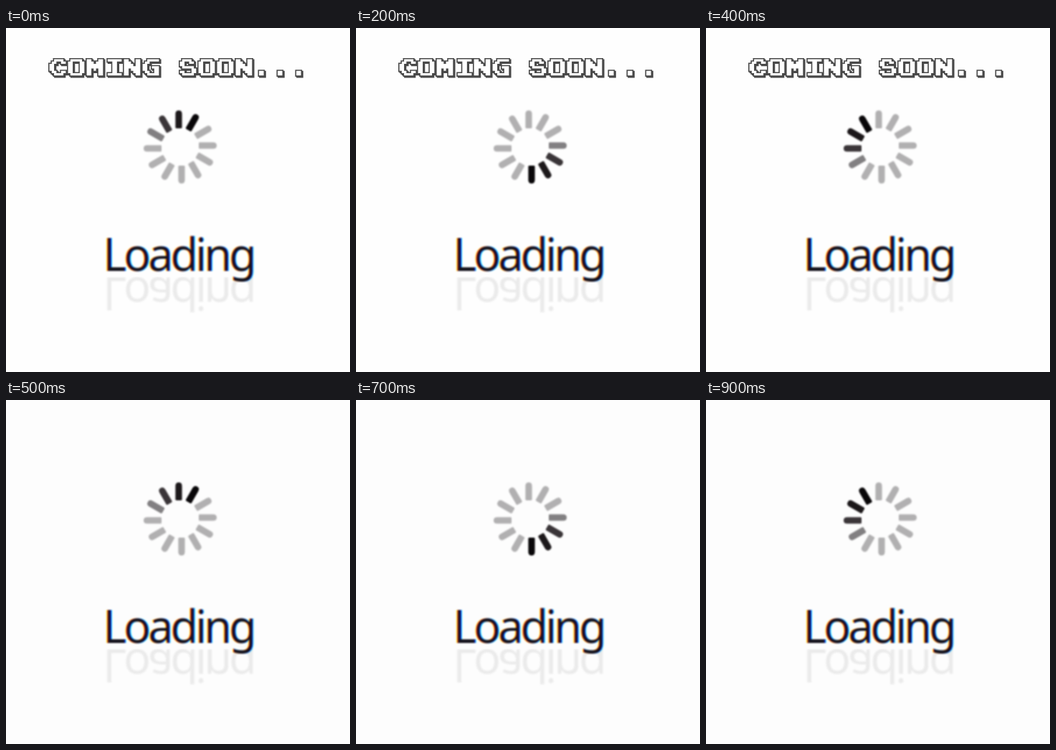
Animation, 480 px wide and 480 px high, one loop 1 s. Source, as an HTML page:

```html
<!DOCTYPE html>
<html lang="en">
<head>
<meta charset="utf-8">
<title>Coming soon</title>
<style>
  html, body { margin: 0; width: 100%; height: 100%; overflow: hidden; background: #fefefe; }
  svg { display: block; width: 100vw; height: 100vh; }
  .soft { filter: blur(0.8px); }
  .word { font: 400 63px "Noto Sans", "Open Sans", sans-serif; letter-spacing: -4.1px; }
  .ink use { mix-blend-mode: multiply; }
</style>
</head>
<body>
<svg viewBox="0 0 480 480">
  <defs>
    <path id="pixels"/>
    <text id="word" class="word">Loading</text>
    <clipPath id="below"><rect x="130" y="347" width="230" height="60"/></clipPath>
  </defs>
  <rect id="back" width="480" height="480"/>
  <g id="title">
    <g fill="#484848" stroke="#484848" stroke-width="3.2">
      <use href="#pixels" x="1.6" y="1.6"/>
      <use href="#pixels"/>
    </g>
    <use href="#pixels" fill="#fff"/>
  </g>
  <g id="spinner" class="soft" transform="translate(243 166)"/>
  <g class="soft" clip-path="url(#below)">
    <use href="#word" transform="translate(135.2 347.6) scale(1 -1)" fill="#ebebeb"/>
  </g>
  <!-- Shifted colour inks give the subpixel fringes. -->
  <g class="ink soft">
    <use href="#word" x="134.1" y="338.9" fill="#ffff1c"/>
    <use href="#word" x="135.2" y="338.9" fill="#ff12ff"/>
    <use href="#word" x="136.3" y="338.9" fill="#14ffff"/>
  </g>
</svg>
<script>
const LOOP = 1000, STEP = 100, BARS = 12;
const CELL = 3.25, LEFT = 60.6, TOP = 43.6;
const TRAIL = ['#080608', '#1c181a', '#3a3538', '#828082'];
const IDLE = '#b1b0b1';
const byId = id => document.getElementById(id);

// Each glyph is seven rows of cells, '#' marking a filled one.
const GLYPHS = {
  C: '..####. .##..## ##..... ##..... ##..... .##..## ..####.',
  O: '.#####. ##...## ##...## ##...## ##...## ##...## .#####.',
  M: '##...## ###.### ####### ####### ##.#.## ##...## ##...##',
  I: '.###### ...##.. ...##.. ...##.. ...##.. ...##.. .######',
  N: '##...## ###..## ####.## ####### ##.#### ##..### ##...##',
  G: '..##### .##.... ##..... ##..### ##...## .##..## ..#####',
  S: '.####.. ##..##. ##..... .#####. .....## ##...## .#####.',
  '.': '....... ....... ....... ....... ....... ..##... ..##...'
};

function pixelPath(text) {
  let path = '';
  [...text].forEach((letter, place) => {
    (GLYPHS[letter] || '').split(' ').forEach((row, y) => {
      for (const run of row.matchAll(/#+/g)) {
        const x = LEFT + (place * 8 + run.index) * CELL;
        const width = run[0].length * CELL;
        path += `M${x} ${TOP + y * CELL}h${width}v${CELL}h${-width}z`;
      }
    });
  });
  return path;
}

byId('pixels').setAttribute('d', pixelPath('COMING SOON...'));

const bars = Array.from({ length: BARS }, (_, i) => {
  const bar = document.createElementNS('http://www.w3.org/2000/svg', 'path');
  // Nearly flat towards the centre, round outside, slightly off the radius.
  bar.setAttribute('d', 'M-5.5 -26L-6.6 -27V-46Q-6.6 -51 -2 -51Q2.6 -51 2.6 -46V-27L1.5 -26z');
  bar.setAttribute('transform', `rotate(${i * 360 / BARS})`);
  byId('spinner').append(bar);
  return bar;
});

function draw(time) {
  const step = Math.floor((time % LOOP) / STEP);
  const head = Math.round(1 + step * 2.4);
  const titled = step < 5;
  byId('title').style.display = titled ? '' : 'none';
  byId('back').setAttribute('fill', titled ? '#fefefe' : '#fdfdfd');
  bars.forEach((bar, i) => {
    const lag = (head - i + 2 * BARS) % BARS;
    bar.setAttribute('fill', TRAIL[lag] || IDLE);
  });
}

const start = performance.now();
function tick() {
  draw(performance.now() - start);
  requestAnimationFrame(tick);
}
tick();
</script>
</body>
</html>
```
